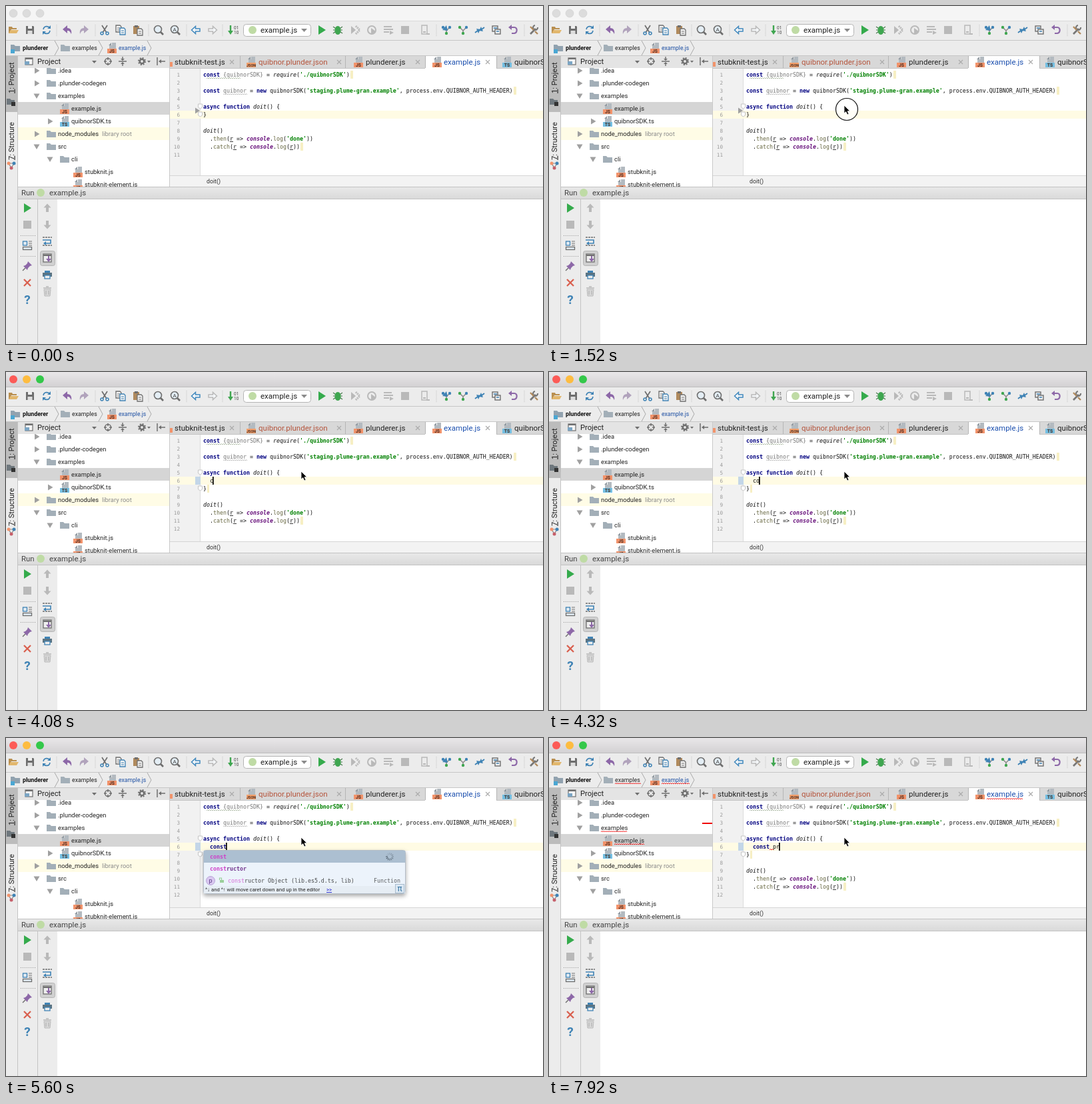
Recreate the animation shown at these times as an HTML page. Size 806x507 px, loop 8 s.

```html
<!DOCTYPE html>
<html lang="en">
<head>
<meta charset="utf-8">
<style>
html, body { margin: 0; width: 100%; height: 100%; overflow: hidden; background: #fff; }
svg { display: block; width: 806px; height: 507px; font-family: Roboto, sans-serif; }
text { white-space: pre; }
.mono { font-family: "DejaVu Sans Mono", monospace; }
.kw { fill: #000080; font-weight: bold; }
.str { fill: #008000; font-weight: bold; }
.obj { fill: #660e7a; font-weight: bold; font-style: italic; }
.method { fill: #66663f; }
.fn { font-style: italic; }
.arg { text-decoration: underline; }
.unused { fill: #777; }
</style>
</head>
<body>
<svg viewBox="0 0 806 507">
  <defs>
    <linearGradient id="active" x2="0" y2="1"><stop stop-color="#e9e7e9"/><stop offset="1" stop-color="#d3d1d3"/></linearGradient>
    <linearGradient id="head" x2="0" y2="1"><stop stop-color="#e9e9e9"/><stop offset="1" stop-color="#d9d9d9"/></linearGradient>
    <clipPath id="tree"><path d="M18 93H246V271H18z"/></clipPath>
    <filter id="shadow" x="-10%" y="-20%" width="120%" height="150%"><feDropShadow dx="0" dy="3" stdDeviation="3" flood-opacity=".35"/></filter>
  </defs>
  <g id="base"></g>
  <g id="live"></g>
</svg>
<script>
const GRAY = '#6e6e6e', PALE = '#b9b9b9', BLUE = '#3f83b5', GREEN = '#3fa650', PURPLE = '#8d68a8', TAN = '#b08a5d', RED = '#f00000';
const LINE = '#c3c3c3', PANEL = '#ececec', ORANGE = '#f2936b', SKY = '#74bfe2';

const rect = (x, y, w, h, fill, more = '') => `<rect x="${x}" y="${y}" width="${w}" height="${h}" fill="${fill}" ${more}/>`;
const shape = (d, fill, more = '') => `<path d="${d}" fill="${fill}" ${more}/>`;
const stroke = (d, color, w = 1.5, more = '') => `<path d="${d}" fill="none" stroke="${color}" stroke-width="${w}" ${more}/>`;
const dot = (x, y, r, fill, more = '') => `<circle cx="${x}" cy="${y}" r="${r}" fill="${fill}" ${more}/>`;
const text = (x, y, s, size, fill = '#222', more = '') => `<text x="${x}" y="${y}" font-size="${size}" fill="${fill}" ${more}>${s}</text>`;
const mono = (x, y, s, more = '') => text(x, y, s, 8.3, '#111', `class="mono" ${more}`);
const at = (x, y, body, more = '') => `<g transform="translate(${x} ${y}) ${more}">${body}</g>`;
const wave = (x, end, y, color) => stroke(`M${x} ${y}` + 'l1.5-1.5 1.5 1.5'.repeat(Math.round((end - x) / 3)), color, 0.9);

// Icons are drawn around their centre
const folder = (x, y, fill = '#a3afb8') => at(x, y, shape('M-7 5V-5h5l2 2h7v8z', fill));
const file = (x, y, label, fill) => at(x, y,
  shape('M0-8H6V8H-4V-4H0z', '#b3bac0') + shape('M-5-4l4-4v4z', '#8f989f') + rect(-7, 1, 14, 7, fill) +
  text(0, 7, label, label.length > 2 ? 5.4 : 6.8, '#4a2c20', 'text-anchor="middle" font-weight="bold"'));
const js = (x, y) => file(x, y, 'JS', ORANGE);
const ts = (x, y) => file(x, y, 'TS', SKY);
const badge = (x, y) => dot(x, y, 6, '#bfdba5');
const play = (x, y) => at(x, y, shape('M-5-7L6 0-5 7z', '#35ab4c'));
const closed = (x, y) => at(x, y, shape('M-3-4.5L4.500 0-3 4.500z', '#a0a0a0'));
const open = (x, y) => at(x, y, shape('M-4.500-3.500h9L0 4z', '#a0a0a0'));
const cross = (x, y) => at(x, y, stroke('M-3-3L3 3M3-3L-3 3', '#aaa', 1.1));
const ARROW = 'M-6.500 0L-.5-5.500V-2H6V2H-.5V5.500z';
const arrow = (x, y, color, turn = 0) => at(x, y, shape(ARROW, color), `rotate(${turn})`);
const hollow = (x, y, color, turn = 0) => at(x, y, shape(ARROW, '#f4f7f9', `stroke="${color}" stroke-width="1.5"`), `rotate(${turn})`);
const bend = (x, y, color, flip = 1) => at(x, y, shape('M-7-1L0-7V-3C5-3 7 1 6 6C4 2 3 1 0 1V5z', color), `scale(${flip} 1)`);
const lens = (x, y, body = '') => at(x, y, dot(-1, -1, 5.5, '#e4eef5', `stroke="${GRAY}" stroke-width="1.6"`) + stroke('M3 3L7 7', GRAY, 2.6) + body);
const page = (x, y, color) => at(x, y, shape('M-4-5H2L4-3V5H-4z', '#f3f3f3', `stroke="${color}" stroke-width="1.3"`) + stroke('M-2-1H2M-2 2H2', color, 1));
const gear = (x, y) => at(x, y, dot(0, 0, 3.2, 'none', `stroke="${GRAY}" stroke-width="2.4"`) + dot(0, 0, 5, 'none', `stroke="${GRAY}" stroke-width="2" stroke-dasharray="2 1.93"`));
const branch = (x, y, color) => at(x, y, stroke('M-5-4L0 1L5-4M0 1V5', '#888', 1.5) + dot(-5, -4, 2.2, color) + dot(5, -4, 2.2, BLUE) + dot(0, 5, 2.2, GREEN));

function toolbar() {
  const y = 36;
  return at(11, y, shape('M-7 5V-5h5l1 2h6v2h-8L-6 5z', '#b98f50') + shape('M-4 0H8L5 5H-7z', '#e2b76d')) +
    at(36, y, shape('M-6-6H5L6-5V6H-6z', GRAY) + rect(-3, -6, 6, 4, '#eee') + rect(-3.5, 1, 7, 5, '#ddd')) +
    at(61, y, stroke('M-5-1C-4-7 3-6 5-3M5 1C4 7-3 6-5 3', BLUE, 1.6) + shape('M6-7V-2H1zM-6 7V2H-1z', BLUE)) +
    bend(92, y, PURPLE) + bend(117, y, '#b1a3bc', -1) +
    at(148, y, stroke('M-4-7L3 4M4-7L-3 4', GRAY, 1.7) + dot(-4, 5, 2, 'none', `stroke="${BLUE}" stroke-width="1.5"`) + dot(4, 5, 2, 'none', `stroke="${BLUE}" stroke-width="1.5"`)) +
    page(169, 34, GRAY) + page(175, 38, BLUE) +
    at(197, y, rect(-6, -6, 9, 12, TAN) + rect(-4, -7, 5, 3, GRAY)) + page(201, 39, GRAY) +
    lens(229, y) + lens(254, y, text(-1, 2, 'A', 8, '#444', 'text-anchor="middle"')) +
    hollow(285, y, '#4088bd') + hollow(310, y, PALE, 180) +
    at(341, y, stroke('M-4-7V3', GREEN, 2.4) + shape('M-8 1H0L-4 7z', GREEN) + text(1, -1, '01', 6.5, '#444') + text(1, 6, '10', 6.5, '#444')) +
    rect(356.5, 27.5, 101, 18, '#fff', 'rx="4" stroke="#b5b5b5"') + badge(370, y) + text(382, 40, 'example.js', 11.5) + shape('M443 34H452L447.500 39z', '#8a8a8a') +
    play(474, y) +
    at(498, y, stroke('M-7-5L7 5M7-5L-7 5M-7 0H7', '#4c7a50', 1.2) + shape('M0-6C6-6 6 7 0 7S-6-6 0-6', GREEN)) +
    at(524, y, shape('M-6-6L1 0L-6 6z', PALE) + stroke('M1-6L7 0L1 6', PALE, 3, 'stroke-dasharray="2 1"')) +
    at(549, y, dot(0, 0, 6, 'none', `stroke="${PALE}" stroke-width="2"`) + shape('M-1-3L6 2L-1 7z', PALE)) +
    at(574, y, stroke('M-7-5H5M-7-1H7M-7 3H1', PALE, 2) + shape('M2 1L8 4L2 7z', PALE)) +
    rect(593, 30, 12, 12, PALE) +
    at(629, y, rect(-5, -7, 8, 13, 'none', `stroke="${PALE}" stroke-width="1.5"`) + stroke('M-3 3H1M2 6H7', PALE, 2)) +
    at(661, y, branch(0, 0, BLUE) + shape('M0-7L2 1L-6 0z', BLUE)) + branch(686, y, GREEN) +
    at(711, y, stroke('M-7 4L-3 1M7-4L3-1', BLUE, 2) + shape('M-5-2L1-1L-2 5zM5 2L-1 1L2-5z', BLUE)) +
    at(736, y, rect(-6, -6, 8, 8, '#eee', `stroke="${GRAY}" stroke-width="1.400"`) + rect(-2, -1, 8, 7, '#eee', `stroke="${GRAY}" stroke-width="1.400"`) + stroke('M-4-3H1M0 2H4', BLUE)) +
    at(761, y, stroke('M-4-4H2C7-4 7 5 1 5H-2', PURPLE, 2.2) + shape('M-7-4L-2-8V0z', PURPLE)) +
    at(792, y, stroke('M-5 6L3-2', '#777', 2.6) + stroke('M6-4A3.500 3.500 0 1 1 2-7', '#777', 2.2) + stroke('M-5-5L0 0M2 2L6 6', TAN, 2.4)) +
    [76, 134, 214, 271, 325, 646, 778].map(x => stroke(`M${x} 28V45`, '#c2c2c2', 1, 'stroke-dasharray="1 1"')).join('');
}

function breadcrumbs() {
  const split = x => stroke(`M${x} 52L${x + 6} 63L${x} 74`, '#aaa', 1);
  return folder(14, 63, '#91a2af') + rect(7, 65, 6, 6, '#4aa7d3') + text(25, 66, 'plunderer', 8.9, '#111', 'font-weight="bold"') + split(73) +
    folder(89, 63) + text(99, 66, 'examples', 8.8) + split(139) +
    js(159, 63) + text(169, 66, 'example.js', 8.6, '#1d4fa3') + split(212);
}

function sidebar() {
  const side = (y, n, s) => at(11.5, y, text(0, 0, `<tspan text-decoration="underline">${n}</tspan>: ${s}`, 11.1), 'rotate(-90)');
  return rect(0, 75, 18, 432, PANEL) + rect(0, 75, 18, 84, '#bcbcbc') + side(131, 1, 'Project') + side(231, 7, 'Structure') +
    at(7, 144, shape('M-6 4V-5H-1L1-3H6V4z', '#6e777d') + rect(1, 0, 6, 6, '#333')) +
    at(8, 239, stroke('M-4-3L4-3L0 4z', '#888', 1.2) + dot(-4, -3, 2.5, ORANGE) + dot(4, -3, 2.5, BLUE) + dot(0, 4, 2.5, '#c65f6a')) +
    stroke('M17.500 75V507', LINE, 1);
}

function project() {
  const name = (x, y, s) => text(x, y + 3, s, 9.4);
  const head = rect(18, 75, 228, 18, '#e4e4e4') +
    at(35, 83, rect(-6, -5, 11, 10, '#f5f5f5', `stroke="${GRAY}" stroke-width="1.2"`) + stroke('M-6-4H5', GRAY, 2) + rect(-7, 0, 7, 5, '#7ba5c4')) +
    text(47, 87, 'Project', 11.2) + shape('M129 82H136L132.500 86z', GRAY) +
    at(153, 83, dot(0, 0, 4.5, 'none', `stroke="${GRAY}" stroke-width="1.5"`) + stroke('M-6 0H-2M2 0H6M0-6V-2M0 2V6', GRAY)) +
    at(175, 83, stroke('M-6 0H6M0-7V-3M0 3V7', GRAY, 1.4) + shape('M-3-4H3L0-1zM-3 4H3L0 1z', GRAY)) +
    gear(204, 83) + shape('M212 82H217L214.500 85z', GRAY) +
    at(232, 83, stroke('M-5-6V6M-2 0H7', GRAY, 1.5) + shape('M-3 0L1-3V3z', GRAY));
  const rows = rect(18, 144, 228, 19, '#d5d5d5') + rect(18, 182, 228, 19, '#fffce6') +
    closed(46, 97) + folder(68, 97) + name(78, 97, '.idea') +
    closed(46, 116) + folder(68, 116) + name(78, 116, '.plunder-codegen') +
    open(46, 135) + folder(68, 135) + name(78, 135, 'examples') +
    js(88, 154) + name(98, 154, 'example.js') +
    closed(66, 173) + ts(88, 173) + name(98, 173, 'quibnorSDK.ts') +
    closed(46, 192) + folder(68, 192) + name(78, 192, 'node_modules') + text(144, 195, 'library root', 9.4, '#8a8a8a') +
    open(46, 211) + folder(68, 211) + name(78, 211, 'src') +
    open(66, 230) + folder(88, 230) + name(98, 230, 'cli') +
    js(108, 249) + name(118, 249, 'stubknit.js') +
    js(108, 268) + name(118, 268, 'stubknit-element.js');
  return rect(18, 93, 228, 178, '#fff') + `<g clip-path="url(#tree)">${rows}</g>` + head +
    stroke('M245.500 75V271', '#c9c9c9', 1);
}

function tabs() {
  const label = (x, s, end, fill) => text(x, 88, s, 11.5, fill) + (end ? cross(end, 84) : '');
  return rect(246, 75, 560, 18, '#d8d8d8') + rect(629, 75, 107, 19, '#fff') +
    [351, 509, 629, 736].map(x => stroke(`M${x}.5 75V93`, '#b5b5b5', 1)).join('') +
    rect(246, 84, 4, 7, ORANGE) + label(253, 'stubknit-test.js', 339) +
    file(368, 84, 'JSON', '#f3a16d') + label(379, 'quibnor.plunder.json', 500, '#b5553d') +
    js(529, 84) + label(540, 'plunderer.js', 618) +
    js(647, 84) + label(657, 'example.js', 723, '#1b4fae') +
    ts(752, 84) + label(763, 'quibnorSDK.ts') +
    stroke('M246 93.500H629M736 93.500H806', LINE, 1);
}

function runPanel() {
  const rule = y => stroke(`M22 ${y}.5H44`, '#888', 1, 'stroke-dasharray="1 2"');
  return rect(18, 271, 788, 19, 'url(#head)') + stroke('M18 271.500H806M18 289.500H806', '#c2c2c2', 1) +
    text(23, 284, 'Run', 11.3, '#444') + badge(52, 280) + text(65, 284, 'example.js', 11.5, '#444') +
    rect(18, 290, 59, 217, PANEL) + stroke('M47.500 290V507', LINE, 1) + rect(77, 290, 729, 217, '#fff') +
    play(32, 303) + rect(26, 322, 12, 12, PALE) + rule(344) +
    at(32, 359, rect(-6.5, -6, 6, 6, '#dfeaf2', `stroke="${BLUE}" stroke-width="1.3"`) + stroke('M2-6H7M2-3H7M2 0H7', GRAY, 1.2) + rect(-6.5, 2.5, 13, 4, '#dfeaf2', `stroke="${GRAY}" stroke-width="1.3"`)) + rule(375) +
    at(32, 390, shape('M1-7L7-1L4 0L1 3L0 6L-6 0L-3-1L0-4z', PURPLE) + stroke('M-3 3L-7 7', GRAY)) +
    at(32, 415, stroke('M-5-5L5 5M5-5L-5 5', '#d9604f', 2.3)) +
    text(32, 447, '?', 19, BLUE, 'text-anchor="middle" font-weight="bold"') +
    arrow(62, 303, PALE, 90) + arrow(62, 328, PALE, -90) +
    at(62, 353, stroke('M-7-6H7M-7 6H7', GRAY, 1.4, 'stroke-dasharray="3 1"') + stroke('M-7-2H5V3H-3', BLUE, 1.6) + shape('M-6 3L-2 0V6z', BLUE)) +
    rect(51.5, 367.5, 22, 22, '#d0d0d0', 'rx="3" stroke="#b5b5b5"') +
    at(62, 378, rect(-6, -6, 12, 12, '#eee', `stroke="${GRAY}" stroke-width="1.3"`) + stroke('M-6-4H6', GRAY, 2) + stroke('M2-3V2', PURPLE, 2) + shape('M-2 1H6L2 6z', PURPLE)) +
    at(62, 403, rect(-4, -6, 8, 3, BLUE) + rect(-7, -3, 14, 6, '#5b7483') + rect(-4, 1, 8, 5, '#eee', `stroke="${BLUE}" stroke-width="1.3"`)) +
    at(62, 428, shape('M-5-3H5L4 7H-4z', '#d8d8d8', `stroke="${PALE}"`) + stroke('M-6-5H6M-2-7H2M-2-1V5M2-1V5', PALE, 1.5));
}

document.getElementById('base').innerHTML =
  rect(0, 0, 806, 507, PANEL) + toolbar() + stroke('M0 51.500H806M0 74.500H806', '#c6c6c6', 1) +
  breadcrumbs() + sidebar() + project() + tabs() + runPanel();

const rowTop = n => 85 + 12 * n;
const CLASSES = [[/^'/, 'str'], [/^(const|new|async|function)$/, 'kw'], [/^console$/, 'obj'], [/^(then|catch|log)$/, 'method'],
  [/^(doit|require)$/, 'fn'], [/^r$/, 'arg'], [/^(quibnor$|\{)/, 'unused']];
const paint = s => s.replace(/'[^']*'|\{\w+\}|\w+/g, w => {
  const hit = CLASSES.find(([re]) => re.test(w));
  return hit ? `<tspan class="${hit[1]}">${w}</tspan>` : w;
});

const TYPED = [[4080, 'c'], [4320, 'co'], [4480, 'con'], [4880, 'cons'], [5200, 'const'], [6160, 'const '], [7840, 'const p'], [7920, 'const pr']];
const CARET_ON = [[1680, 2560], [2960, 3520], [4000, 6640], [7120, 7680], [7840, 8000]];

function editor(t) {
  const added = t >= 2960, clicked = t >= 1600;
  const typed = TYPED.reduce((s, [from, v]) => t >= from ? v : s, '');
  const row = added || !clicked ? 6 : 5;
  const lines = ["const {quibnorSDK} = require('./quibnorSDK')", '',
    "const quibnor = new quibnorSDK('staging.plume-gran.example', process.env.QUIBNOR_AUTH_HEADER)", '',
    'async function doit() {', ...(added ? ['  ' + typed] : []), '}', '',
    'doit()', "  .then(r => console.log('done'))", '  .catch(r => console.log(r))', ''];
  const end = added ? 7 : 6, last = lines.length - 1;
  const tint = (x, n, w = 4) => rect(x, rowTop(n), w, 12, '#f7efc4');
  const fold = n => shape(`M288.500 ${rowTop(n) + 2}h6v5l-3 2-3-2z`, '#fff', 'stroke="#c4c4c4"');
  let out = rect(246, 94, 560, 160, '#fff') + rect(246, 94, 46, 160, '#f1f1f1') + stroke('M291.500 94V254', '#dcdcdc', 1) +
    rect(246, rowTop(row), 560, 12, '#fffbe4') + tint(517, 1) + tint(762, 3) + tint(442, last);
  if (added) out += rect(284, rowTop(6), 8, 12, '#c3d6e8') + tint(302, 7, 3);
  else out += shape('M284 152.500L291 157L284 161.500z', '#a0a0a0');
  if (clicked && !added) out += rect(406, 146, 5, 11, '#99ccff') + rect(296, 158, 5, 11, '#99ccff');
  if (t >= 1920 && !added) out += rect(283, 145, 1.2, 24, '#8fb3d6');
  out += fold(5) + fold(end);
  lines.forEach((s, i) => {
    const y = rowTop(i + 1) + 9;
    out += text(261, y, i + 1, 7.6, '#999', 'class="mono" text-anchor="end"') + mono(296, y, paint(s));
  });
  out += wave(301, 351, 109, '#a9b7a0') + wave(326, 361, 133, '#b5b5b5');
  if (CARET_ON.some(([a, b]) => t >= a && t < b)) out += rect(added ? 305 + 5 * typed.length : 410, rowTop(row), 1.7, 12, '#000');
  return out + rect(246, 254, 560, 17, '#f3f3f3') + stroke('M246 254.500H806', '#d5d5d5', 1) + text(301, 266, 'doit()', 8.8, '#333');
}

function popup(t) {
  const hit = t < 4960 ? 3 : t < 5280 ? 4 : 5, late = t >= 5360;
  const word = (y, s) => mono(306, y, `<tspan fill="#cf3fc9">${s.slice(0, hit)}</tspan><tspan fill="#74368f">${s.slice(hit)}</tspan>`, 'font-weight="bold"');
  let spokes = '';
  for (let i = 0; i < 12; i++) spokes += `<path d="M0-3V-6" stroke="#34424e" opacity="${0.1 + i / 14}" transform="rotate(${30 * (i + t / 80)})"/>`;
  return rect(296.5, 168.5, 303, 65, '#ecf3fb', 'rx="3" stroke="#b3bcc6" filter="url(#shadow)"') +
    rect(297, 169, 302, 18, '#acbfd1') + rect(297, 222, 302, 11, '#e6edf4') +
    word(181, 'const') + word(199, 'constructor') + at(576, 178, spokes) +
    (late
      ? dot(307, 214, 6.5, '#d9c8f0', 'stroke="#b9a5d8"') + text(307, 217, 'p', 9, '#5b3b86', 'text-anchor="middle"') +
        rect(321, 213, 6, 4, '#9bcf9b') + stroke('M320.500 213V210H323.500V213', '#9bcf9b', 1.2) +
        mono(333, 217, '<tspan fill="#cf3fc9">const</tspan>ructor Object (lib.es5.d.ts, lib)', 'fill-opacity=".75"') + mono(552, 217, 'Function', 'fill-opacity=".65"')
      : word(217, 'continue')) +
    text(299, 230, late ? '^↓ and ^↑ will move caret down and up in the editor' : 'Press ^. to choose the selected (or first) suggestion and insert a dot afterwards', 7.7) +
    text(late ? 481 : 575, 230, '&gt;&gt;', 7.7, '#00c', 'text-decoration="underline"') +
    rect(584.5, 219.5, 13, 13, '#dce8f3', 'stroke="#a9bccd"') + text(591, 230, 'π', 12, '#2e6f9e', 'text-anchor="middle"');
}

const ease = (t, a, b) => { const k = Math.min(1, Math.max(0, (t - a) / (b - a))); return k * k * (3 - 2 * k); };

function pointer(t) {
  if (t < 320) return '';
  const a = ease(t, 240, 640), b = ease(t, 800, 1360);
  const x = 520 - 40 * a - 37 * b, y = 505 - 315 * a - 41 * b;
  const ring = t >= 1440 && t < 1680 ? dot(447, 155, 16.5, '#fff', 'fill-opacity=".7" stroke="#111" stroke-width="1.2"') : '';
  return ring + at(x, y, shape('M0 0V12L2.700 9.500L4.800 14L7 13L5 8.700H8.700z', '#000', 'stroke="#fff" stroke-width=".8"'));
}

function titleBar(t) {
  const on = t >= 1600;
  return rect(0, 0, 806, 22, on ? 'url(#active)' : '#f5f5f5') + stroke('M0 22.500H806', on ? '#bdbdbd' : '#dadada', 1) +
    ['#fc5b57', '#fdbc40', '#34c84a'].map((c, i) => dot(11 + 20 * i, 11, 6, on ? c : '#dcdcdc', on ? '' : 'stroke="#c9c9c9" stroke-width=".5"')).join('');
}

const errors = () => [[99, 138, 69], [169, 211, 69], [78, 117, 141], [98, 143, 160], [657, 712, 92], [331, 337, 168]]
  .map(([x, end, y]) => wave(x, end, y, RED)).join('') + rect(230, 127, 15, 2, RED);

const live = document.getElementById('live');
let drawn = -1;
function frame(now) {
  const t = Math.floor(now % 8000 / 80) * 80;
  if (t !== drawn) {
    drawn = t;
    live.innerHTML = titleBar(t) + editor(t) + (t >= 7040 ? errors() : '') +
      (t >= 4800 && t < 6160 ? popup(t) : '') + pointer(t);
  }
  requestAnimationFrame(frame);
}
frame(performance.now());
</script>
</body>
</html>
```
